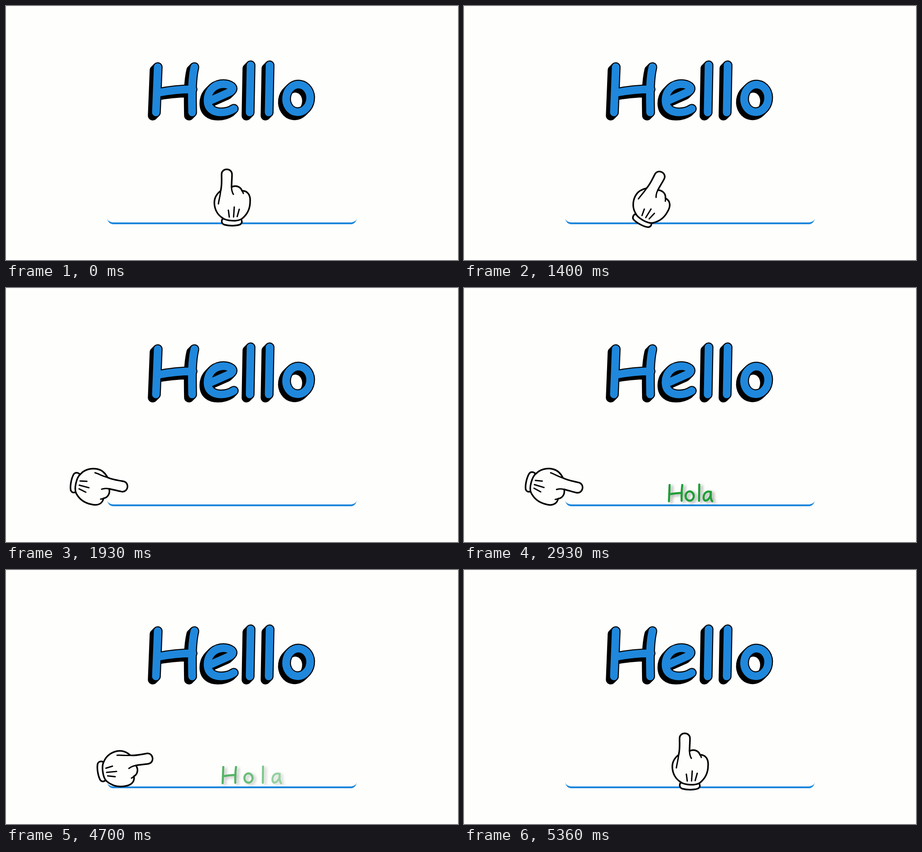
Write an HTML page that moves like this. It is 998 by 561 pixels and loops after 5660 ms.

```html
<!DOCTYPE html>
<html lang="en">
<head>
<meta charset="utf-8">
<title>Hello</title>
<style>
  html, body { margin: 0; width: 100%; height: 100%; overflow: hidden; background: #fefefd; }
  svg { position: absolute; left: 0; top: 0; display: block; }
  path, ellipse { stroke-linecap: round; stroke-linejoin: round; }
  .field {
    position: absolute; left: 224px; top: 440px; width: 550px; height: 42px;
    box-sizing: border-box; border-bottom: 4px solid #1d87dc; border-radius: 0 0 13px 13px;
  }
  .edge {
    position: absolute; left: 0; top: 0; width: 998px; height: 561px; box-sizing: border-box;
    border: 1px solid #f4f4f4; border-bottom: 0;
  }
  #word g { filter: drop-shadow(5px 3px 3px rgba(0, 0, 0, .35)); }
</style>
</head>
<body>
<div class="edge"></div>
<div class="field"></div>
<svg width="998" height="561" viewBox="0 0 998 561">
  <defs>
    <g id="hello" fill="none">
      <path d="M335 135L331 235M334 192Q375 184 412 184M416 135C410 160 410 190 411 235"/>
      <path d="M449 210L494 190Q504 184 498 178Q488 171 474 173C455 176 445 192 445 208C445 227 458 235 475 235C488 235 497 231 503 227"/>
      <path d="M540 131L538 235M582 131L580 235"/>
      <ellipse cx="645" cy="204" rx="26.5" ry="30.5" transform="rotate(8 645 204)"/>
    </g>
  </defs>

  <g role="img" aria-label="Hello">
    <g stroke="#000" stroke-width="21.5">
      <use href="#hello" x="-7" y="7"/>
      <use href="#hello" x="-4.5" y="4.5"/>
      <use href="#hello" x="-2" y="2"/>
      <use href="#hello"/>
    </g>
    <use href="#hello" stroke="#1f88dc" stroke-width="17"/>
  </g>

  <g id="word" role="img" aria-label="Hola" fill="none" stroke="#1e9e36" stroke-width="4.6">
    <g><path d="M454 435L452.5 471M453 455.5Q468 453 481 452.5M482 435Q480 450 480.5 470"/></g>
    <g><ellipse cx="498.3" cy="459.5" rx="9" ry="10.3"/></g>
    <g><path d="M519.5 434L519 470"/></g>
    <g><path d="M544 450.5C536 447 529 454 529 463C529 473 539 472 545 457M545 450C544 460 544.5 467 548 471"/></g>
  </g>

  <g id="hand" fill="#fefefd" stroke="#000" stroke-width="3.5">
    <path d="M478 470C475 475 476 481 482 483C492 486 508 486 517 482.5C522 479.5 522 474 518 470Z"/>
    <path d="M474 408C464 416 460 426 460 434C460 450 468 462 478 468C486 475 512 477 522 469C534 459 539 445 539 432C540 418 534 408 521 408C518 399 507 395 498 400C498 391 499 381 499 372C499 357 476 357 476 372C476 388 477 396 474 408Z"/>
    <g fill="none" stroke-width="3">
      <path d="M474 408C473 420 470 428 469 437"/>
      <path d="M498 400Q498 409 502 416M521 408Q523 410 524 414"/>
      <path d="M491 451L493 466M504 444L502.5 466M515 449L510.5 465"/>
    </g>
  </g>
</svg>
<script>
const LOOP = 5660;
const HOME = [500, 423], AWAY = [198, 441.5], TURN = 103;
const OUT = 1035, BACK = 4370, TRAVEL = 1000;
// Per letter: time it is typed, time it starts to drift off
const LETTERS = [[2060, 4593], [2360, 4546], [2660, 4500], [2930, 4453]];
const DRIFT = 110, FADE = 460;

const hand = document.getElementById('hand');
const glyphs = [...document.getElementById('word').children];
const clamp = v => Math.min(1, Math.max(0, v));
const ease = u => u < .5 ? 2 * u * u : 1 - 2 * (1 - u) ** 2;
const travel = (t, start) => ease(clamp((t - start) / TRAVEL));

function draw(t) {
  const p = travel(t, OUT) - travel(t, BACK);
  const [x, y] = HOME.map((h, i) => h + (AWAY[i] - h) * p);
  hand.setAttribute('transform',
    `translate(${x} ${y}) rotate(${TURN * p}) translate(${-HOME[0]} ${-HOME[1]})`);

  glyphs.forEach((g, i) => {
    const [typed, leave] = LETTERS[i];
    const u = clamp((t - leave) / FADE);
    g.setAttribute('transform', `translate(${DRIFT * u} 0)`);
    g.style.opacity = t < typed ? 0 : 1 - u;
  });
}

const begin = performance.now();
function tick() {
  draw((performance.now() - begin) % LOOP);
  requestAnimationFrame(tick);
}
tick();
</script>
</body>
</html>
```
